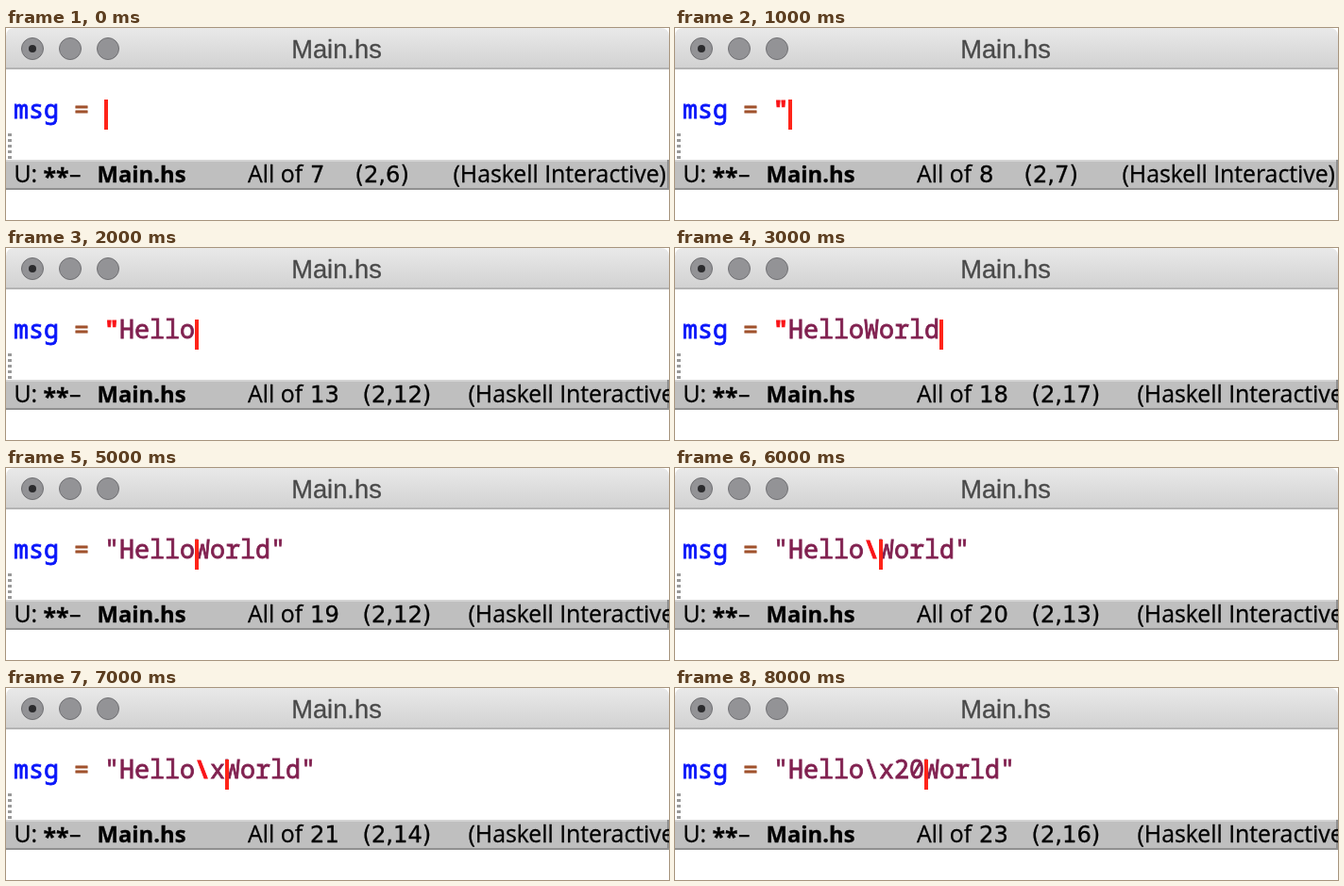
Write an HTML page that moves like this. It is 702 by 204 pixels and loops after 9 s.

```html
<!DOCTYPE html>
<html lang="en">
<head>
<meta charset="utf-8">
<title>Main.hs</title>
<style>
html, body { margin: 0; width: 100%; height: 100%; overflow: hidden; background: #fff; }
svg { display: block; }
text { white-space: pre; fill: currentColor; stroke: currentColor; stroke-width: .3px; }
tspan { fill: currentColor; stroke: currentColor; }
.code { font: 26.667px "Noto Sans Mono", monospace; font-variant-ligatures: none; }
.code text { stroke-width: .8px; }
.bar { font: 24.8px "Open Sans", sans-serif; }
.num { font: 24.2px "DejaVu Sans", sans-serif; }
.bold { font-weight: 700; }
.name { font-size: 23.8px; }
.title { font: 27.3px "Liberation Sans", Arial, sans-serif; color: #4a4a4a; }
.error { color: #fa1418; font-weight: 700; }
</style>
</head>
<body>
<svg width="702" height="204" viewBox="0 0 702 204">
  <defs>
    <linearGradient id="chrome" x2="0" y2="1">
      <stop stop-color="#e9e9e9"/><stop offset="1" stop-color="#d1d1d1"/>
    </linearGradient>
  </defs>

  <path d="M0 44V9Q0 0 9 0H693Q702 0 702 9V44Z" fill="url(#chrome)"/>
  <path d="M0 43H702" stroke="#b4b4b4" stroke-width="2"/>
  <g fill="#939396" stroke="#707073">
    <circle cx="28" cy="22" r="11.5"/>
    <circle cx="68" cy="22" r="11.5"/>
    <circle cx="108" cy="22" r="11.5"/>
  </g>
  <circle cx="28" cy="22" r="4" fill="#2a2a2c"/>
  <text class="title" x="350" y="32" text-anchor="middle">Main.hs</text>

  <g class="code">
    <text x="8" y="96" color="#0a16fa">msg</text>
    <text x="72" y="96" color="#a0522d">=</text>
    <text id="string" x="104" y="96" color="#812150"></text>
  </g>
  <rect id="cursor" y="76" width="4" height="32" fill="#ff2419"/>
  <path d="M4 112V139" stroke="#999" stroke-width="4" stroke-dasharray="3"/>

  <path d="M0 140H702V172H0Z" fill="#bfbfbf"/>
  <path d="M0 141H702" stroke="#d4d4d4" stroke-width="2"/>
  <path d="M0 171H701V140" fill="none" stroke="#909090" stroke-width="2"/>
  <g class="bar">
    <text x="8.5" y="164">U:</text>
    <text class="bold" x="39.5" y="167">**</text>
    <text x="67" y="164">–</text>
    <text class="bold name" x="96.5" y="164">Main.hs</text>
    <text x="256" y="164">All of</text>
    <text id="mode" y="164">(Haskell Interactive)</text>
  </g>
  <g class="num">
    <text id="size" x="322" y="164"></text>
    <text id="place" y="164"></text>
  </g>
</svg>
<script>
const $ = id => document.getElementById(id);
const BASE = 7, START = 6, CELL = 16, STEP = 1000;

// Each step: string typed so far, cursor offset in it, index of a faulty character.
const steps = [
  ['', 0, -1],
  ['"', 1, 0],
  ['"Hello', 6, 0],
  ['"HelloWorld', 11, 0],
  ['"HelloWorld"', 12, -1],
  ['"HelloWorld"', 6, -1],
  ['"Hello\\World"', 7, 6],
  ['"Hello\\xWorld"', 8, 6],
  ['"Hello\\x20World"', 10, -1]
];

function span(text, error) {
  const node = document.createElementNS('http://www.w3.org/2000/svg', 'tspan');
  node.textContent = text;
  if (error) node.setAttribute('class', 'error');
  return node;
}

function show([text, offset, bad]) {
  const parts = bad < 0 ? [span(text)] :
    [span(text.slice(0, bad)), span(text[bad], true), span(text.slice(bad + 1))];
  $('string').replaceChildren(...parts);

  const column = START + offset, size = BASE + text.length;
  $('cursor').setAttribute('x', 8 + column * CELL);
  $('size').textContent = size;
  $('place').textContent = `(2,${column})`;
  $('place').setAttribute('x', size < 10 ? 369.5 : 377.5);
  $('mode').setAttribute('x', column < 10 ? 473.5 : 489.5);
}

let current = -1;
function tick() {
  const index = Math.floor(performance.now() / STEP) % steps.length;
  if (index !== current) show(steps[current = index]);
  requestAnimationFrame(tick);
}
tick();
</script>
</body>
</html>
```
